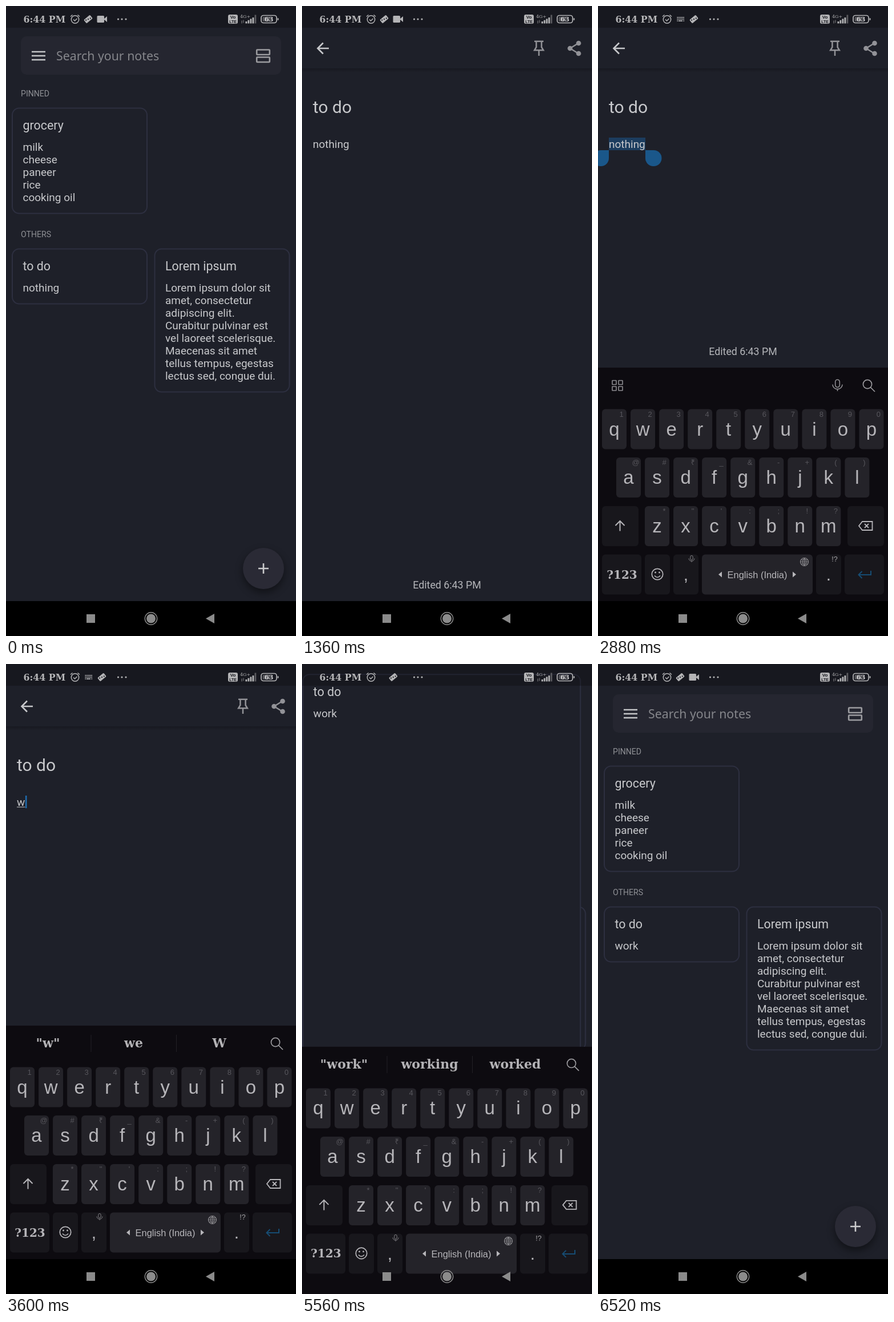
An HTML page with a canvas that plays this animation: 508x1101 px, repeating every 6640 ms.

```html
<!DOCTYPE html>
<html lang="en">
<head>
<meta charset="utf-8">
<title>Notes</title>
<style>
html, body { margin: 0; width: 100%; height: 100%; overflow: hidden; background: #000; }
canvas { display: block; width: 508px; height: 1101px; }
</style>
</head>
<body>
<canvas id="stage"></canvas>
<script>
const W = 508, H = 1101, LOOP = 6640, NAV = 1040, KB = 632;
const canvas = document.getElementById('stage');
const c = canvas.getContext('2d');
const dpr = window.devicePixelRatio || 1;
canvas.width = W * dpr;
canvas.height = H * dpr;

const ROBOTO = 'Roboto, sans-serif';
const SANS = '"Liberation Sans", sans-serif';
const SERIF = '"DejaVu Serif", serif';
const BG = '#1e2029', INK = '#c8c9cc', MUTE = '#8f9095', STATUS = '#b4b4b6', KEY_INK = '#b7b6ba';
const LOREM = ['Lorem ipsum dolor sit', 'amet, consectetur', 'adipiscing elit.', 'Curabitur pulvinar est',
  'vel laoreet scelerisque.', 'Maecenas sit amet', 'tellus tempus, egestas', 'lectus sed, congue dui.'];

// Timeline in ms
const OPEN = 890, SELECT = 2200, POP = 5524, FLIGHT = 300;
const TYPED = [
  [3440, 'w', ['"w"', 'we', 'W']],
  [3800, 'wo', ['"wo"', 'would', 'work']],
  [4120, 'wor', ['"wor"', 'work', 'word']],
  [4460, 'work', ['"work"', 'working', 'worked']]
];

const CARD = { x: 10.5, y: 424, r: 247.5, b: 521 };
const FULL = { x: 0, y: 0, r: W, b: NAV };

const ramp = (t, a, b) => Math.min(1, Math.max(0, (t - a) / (b - a)));

// cubic-bezier(.4, 0, .2, 1)
function fastOutSlowIn(x) {
  let lo = 0, hi = 1;
  for (let i = 0; i < 24; i++) {
    const s = (lo + hi) / 2, q = 1 - s;
    if (1.2 * s * q * q + 0.6 * s * s * q + s * s * s < x) lo = s; else hi = s;
  }
  return lo * lo * (3 - 2 * lo);
}

// Corner travels on a circular arc that ends vertically
function arc(ax, ay, bx, by, p) {
  const dx = ax - bx, dy = ay - by, d = Math.hypot(dx, dy);
  const r = d * d / (2 * Math.abs(dx));
  const s = 2 * Math.asin(d / (2 * r)) * (1 - p);
  return [bx + Math.sign(dx) * r * (1 - Math.cos(s)), by + Math.sign(dy) * r * Math.sin(s)];
}

function flight(a, b, u) {
  const p = fastOutSlowIn(u);
  const [x, y] = arc(a.x, a.y, b.x, b.y, p);
  const [r, bottom] = arc(a.r, a.b, b.r, b.b, p);
  return { x, y, r, b: bottom };
}

function text(s, x, y, size, color = INK, font = ROBOTO, align = 'left', weight = 400) {
  c.font = `${weight} ${size}px ${font}`;
  c.textAlign = align;
  c.fillStyle = color;
  c.fillText(s, x, y);
}

function box(x, y, w, h, r, fill, stroke, lw = 1.5) {
  c.beginPath();
  c.roundRect(x, y, w, h, r);
  if (fill) { c.fillStyle = fill; c.fill(); }
  if (stroke) { c.strokeStyle = stroke; c.lineWidth = lw; c.stroke(); }
}

function dot(x, y, r, fill, stroke, lw = 1.5) {
  c.beginPath();
  c.arc(x, y, r, 0, 7);
  if (fill) { c.fillStyle = fill; c.fill(); }
  if (stroke) { c.strokeStyle = stroke; c.lineWidth = lw; c.stroke(); }
}

function icon(path, x, y, color, lw = 2, filled) {
  c.save();
  c.translate(x, y);
  const p = new Path2D(path);
  if (filled) { c.fillStyle = color; c.fill(p); }
  else { c.strokeStyle = color; c.lineWidth = lw; c.stroke(p); }
  c.restore();
}

function card(q, title, lines) {
  box(q.x + .5, q.y + .5, q.r - q.x - 1, q.b - q.y - 1, 12, BG, '#2d2f40', 2);
  text(title, q.x + 19, q.y + 38, 21.4);
  lines.forEach((s, i) => text(s, q.x + 19, q.y + 75 + 22 * i, 19));
}

function home(todo) {
  c.fillStyle = BG;
  c.fillRect(0, 0, W, NAV);
  box(26, 53, 456, 67, 10, '#252630');
  icon('M-12 -7H12M-12 0H12M-12 7H12', 57, 87, '#c4c5c7', 2.6);
  text('Search your notes', 88, 95, 21.3, '#85868b', '"Noto Sans", sans-serif');
  for (const y of [76.5, 89.5]) box(439.2, y, 22.6, 8.5, 1, null, '#9b9b9f', 2.6);
  text('PINNED', 26, 158, 14.1, MUTE);
  text('OTHERS', 26, 404, 14.1, MUTE);
  card({ x: 10.5, y: 178, r: 247.5, b: 363 }, 'grocery', ['milk', 'cheese', 'paneer', 'rice', 'cooking oil']);
  if (todo) card(CARD, 'to do', [todo]);
  card({ x: 260, y: 424, r: 497, b: 675 }, 'Lorem ipsum', LOREM);
  c.save();
  c.shadowColor = 'rgba(0,0,0,.45)';
  c.shadowBlur = 14 * dpr;
  c.shadowOffsetY = 6 * dpr;
  dot(451, 983, 36, '#2a2a35');
  c.restore();
  icon('M-9 0H9M0 -9V9', 451, 983, '#cbcbcd', 2.6);
}

function detail(q, t) {
  const w = q.r - q.x;
  c.save();
  c.beginPath();
  c.rect(q.x, q.y, w, q.b - q.y);
  c.clip();
  c.translate(q.x, q.y);
  c.fillStyle = BG;
  c.fillRect(0, 0, w, q.b - q.y);
  const shade = c.createLinearGradient(0, 109, 0, 116);
  shade.addColorStop(0, 'rgba(0,0,0,.22)');
  shade.addColorStop(1, 'rgba(0,0,0,0)');
  c.fillStyle = shade;
  c.fillRect(0, 109, w, 7);
  icon('M10.5 0H-8M.5 -9.5L-9 0L.5 9.5', 36.5, 74, '#c6c7ca', 2.6);
  icon('M-8 -11.3H8M-4.6 -11V-1L-7.8 4.3H7.8L4.6 -1V-11M0 4V14', w - 93, 73, '#929297', 2.5);
  const sx = w - 31;
  icon('M8 -9.5L-7.5 0L8 9.5', sx, 74, '#929297', 2.4);
  for (const [x, y] of [[7.5, -9], [-7.5, 0], [7.5, 9]]) dot(sx + x, 74 + y, 4.3, '#929297');
  text('to do', 19, 187, 30);

  const typed = TYPED.filter(k => t >= k[0]).pop();
  if (typed) {
    const [since, word] = typed;
    text(word, 19, 248, 19);
    const tw = c.measureText(word).width;
    c.fillRect(19, 249.5, tw, 1);
    if ((t - since) % 1000 < 500) {
      c.fillStyle = '#1f6cae';
      c.fillRect(19 + tw + .6, 230, 2.6, 22);
    }
  } else {
    if (t >= SELECT) {
      c.fillStyle = '#1c3d5f';
      c.fillRect(19, 230, 64, 22);
      box(83, 252, 28.5, 28, [0, 14, 14, 14], '#1a578a');
      box(-9.5, 252, 28.5, 28, [14, 0, 14, 14], '#1a578a');
    }
    text('nothing', 19, 248, 19);
    text('Edited 6:43 PM', w / 2, q.b - q.y - 22.5, 17.8, '#b6b7bb', ROBOTO, 'center');
  }
  c.restore();
}

function statusBar(t) {
  c.fillStyle = 'rgba(0,0,0,.25)';
  c.fillRect(0, 0, W, 38);
  text('6:44 PM', 30.5, 29, 15.8, STATUS, SERIF, 'left', 700);
  dot(121, 23.5, 6.7, null, STATUS, 1.5);
  icon('M-8 -5L-4.5 -8M8 -5L4.5 -8M-3 0L-.5 2.5L3.5 -1.5', 121, 23.5, STATUS, 1.5);

  const back = ramp(t, 5580, 5740);
  const push = t < 4000 ? ramp(t, 2360, 2480) : 0;
  const diceX = 144 + 24 * (t < 4000 ? push : 1 - ramp(t, 5520, 5640));
  const videoX = 168 + 24 * (t < 4000 ? push : 1 - back);
  if (t >= 2440 && t < 5560) {
    for (let row = 0; row < 3; row++)
      for (let i = 0; i < 6; i++) {
        c.fillStyle = STATUS;
        if (row < 2 || i === 0 || i === 5) c.fillRect(138.5 + i * 2.2, 19 + row * 3, 1.5, 1.8);
      }
    c.fillRect(141, 25, 7, 1.8);
  }
  c.save();
  c.translate(diceX, 23);
  c.rotate(-.7);
  box(-7, -4, 14, 8, 1.5, STATUS);
  for (const x of [-4, 0, 4]) dot(x, x ? 1.3 * Math.sign(x) : 0, 1.1, '#17181f');
  c.restore();
  if (videoX < 191.5) {
    box(videoX - 8.5, 17, 12.5, 12, 1.5, STATUS);
    icon('M3 0L9 -5V5Z', videoX, 23, STATUS, 1, true);
  }
  const wide = 10 * Math.sin(Math.PI * back);
  [196.5, 203, 210 + wide].forEach(x => dot(x, 23, 1.6, STATUS));

  box(389, 15, 17, 16, 3, STATUS);
  text('Vo', 397.5, 22.3, 8, '#17181f', SANS, 'center', 700);
  text('LTE', 397.5, 29.6, 7, '#17181f', SANS, 'center', 700);
  text('4G+', 410, 20.5, 8, STATUS, SERIF);
  icon('M-1.5 3V-2M1.5 -3V2', 414.5, 27.5, '#77777b', 1.2);
  for (let i = 0; i < 5; i++) {
    c.fillStyle = i < 4 ? STATUS : '#5a5a5f';
    const h = i < 4 ? 3.5 + 2.3 * i : 15;
    c.fillRect(419.5 + i * 4, 30.5 - h, 2.8, h);
  }
  box(447, 16.5, 27, 13, 4, null, STATUS, 1.7);
  box(449.5, 19, 14, 8, 1.5, '#55555a');
  box(475.5, 21, 2, 4, 1, STATUS);
  text('63', 460.5, 27.3, 11.3, '#cfcfd1', SERIF, 'center', 700);
}

function mic(x, y, k, color) {
  c.save();
  c.translate(x, y);
  c.scale(k, k);
  icon('M-4 -6A4 4 0 0 1 4 -6V0A4 4 0 0 1 -4 0ZM-9 -1A9 8.5 0 0 0 9 -1M0 7.5V11', 0, 0, color, 1.7);
  c.restore();
}

function keyRow(letters, hints, x0, y) {
  [...letters].forEach((ch, i) => {
    const x = x0 + 50.05 * i;
    box(x, y, 43, 70, 6, '#242329');
    text(ch, x + 21.5, y + 46, 33, KEY_INK, SANS, 'center');
    text(hints[i], x + 34, y + 13, 13, '#57565c', SANS, 'center');
  });
}

function keyboard(t, dy) {
  c.save();
  c.beginPath();
  c.rect(0, KB, W, (dy > 0 ? H : NAV) - KB);
  c.clip();
  c.translate(0, dy);
  c.fillStyle = '#0d0b10';
  c.fillRect(0, KB, W, H - KB);

  const typed = TYPED.filter(k => t >= k[0]).pop();
  if (typed) {
    typed[2].forEach((s, i) => text(s, 73.5 + 150 * i, 670, 22, '#b4b3b6', SERIF, 'center', 700));
    c.fillStyle = '#222126';
    c.fillRect(148.5, 648, 1, 30);
    c.fillRect(298, 648, 1, 30);
  } else {
    for (const x of [25, 36]) for (const y of [654.5, 665]) box(x, y, 7, 7, .5, null, '#8d8c90', 1.6);
    mic(419.5, 662.5, .95, '#8d8c90');
  }
  dot(472, 661, 7.6, null, '#9a999d', 1.7);
  icon('M0 0L7.5 7.5', 477.5, 666.5, '#9a999d', 1.7);

  keyRow('qwertyuiop', '1234567890', 7, 704.5);
  keyRow('asdfghjkl', '@#₹_&-+()', 32, 789);
  keyRow('zxcvbnm', '*"\':;!?', 82, 874);
  const dark = '#18171c';
  for (const [x, y, w] of [[7, 874, 64], [437, 874, 64], [7, 958.5, 69], [82, 958.5, 44],
    [132, 958.5, 44], [382, 958.5, 44], [432, 958.5, 69]]) box(x, y, w, 70, 6, dark);
  icon('M0 9V-8M-8 -.5L0 -8.5L8 -.5', 38.5, 908.5, KEY_INK, 2);
  icon('M-12 0L-6 -7.5H11.5V7.5H-6ZM-2 -3.5L5 3.5M5 -3.5L-2 3.5', 469, 908.5, KEY_INK, 1.8);

  text('?123', 42, 1000.5, 20, KEY_INK, SERIF, 'center', 700);
  dot(104, 993, 9.7, null, KEY_INK, 1.7);
  dot(100.5, 990, 1.4, KEY_INK);
  dot(107.5, 990, 1.4, KEY_INK);
  icon('M-5 2.5Q0 8.5 5 2.5', 104, 993, KEY_INK, 1.6);
  text(',', 154, 1004, 30, KEY_INK, SANS, 'center');
  mic(164, 966, .55, '#8a898d');
  box(182, 958.5, 194, 70, 6, '#242329');
  text('English (India)', 279, 1000, 16.4, KEY_INK, SANS, 'center');
  icon('M-3 0L3 -5V5Z', 214, 993.5, KEY_INK, 1, true);
  icon('M3 0L-3 -5V5Z', 344, 993.5, KEY_INK, 1, true);
  dot(361.5, 971.5, 7, null, '#8a898d', 1.2);
  icon('M-7 0H7M0 -7V7M-6 -3.5H6M-6 3.5H6M0 -7Q-6.5 0 0 7Q6.5 0 0 -7', 361.5, 971.5, '#8a898d', 1);
  text('.', 404, 1004, 30, KEY_INK, SANS, 'center');
  text('!?', 414.5, 971, 12.5, '#a5a4a8', SANS, 'center');
  icon('M11 -6V1H-10M-4.5 -5L-10.5 1L-4.5 7', 467, 993, '#164c73', 2);
  c.restore();
}

function navIcons() {
  c.fillStyle = '#8b8b8b';
  c.fillRect(141, 1063, 15, 15);
  dot(254, 1070.5, 10.7, null, '#8b8b8b', 1.4);
  dot(254, 1070.5, 8, '#8b8b8b');
  icon('M-8 0L7 -8.5V8.5Z', 358, 1070.5, '#8b8b8b', 1, true);
}

function draw(t) {
  c.setTransform(dpr, 0, 0, dpr, 0, 0);
  c.fillStyle = '#000';
  c.fillRect(0, 0, W, H);
  const landed = POP + FLIGHT;
  if (t < OPEN || t >= POP) home(t < OPEN ? 'nothing' : t >= landed ? 'work' : '');
  else if (t < OPEN + FLIGHT) {
    home('');
    detail(flight(CARD, FULL, (t - OPEN) / FLIGHT), t);
  } else detail({ ...FULL, b: t < SELECT ? NAV : KB }, t);
  if (t >= POP && t < landed) card(flight(FULL, CARD, (t - POP) / FLIGHT), 'to do', ['work']);
  statusBar(t);
  c.fillStyle = '#000';
  c.fillRect(0, NAV, W, H - NAV);
  const hide = ramp(t, 5519, 5751);
  if (t >= SELECT && hide < 1) keyboard(t, (H - KB) * (1 - Math.cos(Math.PI * hide)) / 2);
  navIcons();
}

const start = performance.now();
function tick() {
  draw((performance.now() - start) % LOOP);
  requestAnimationFrame(tick);
}
tick();
</script>
</body>
</html>
```
